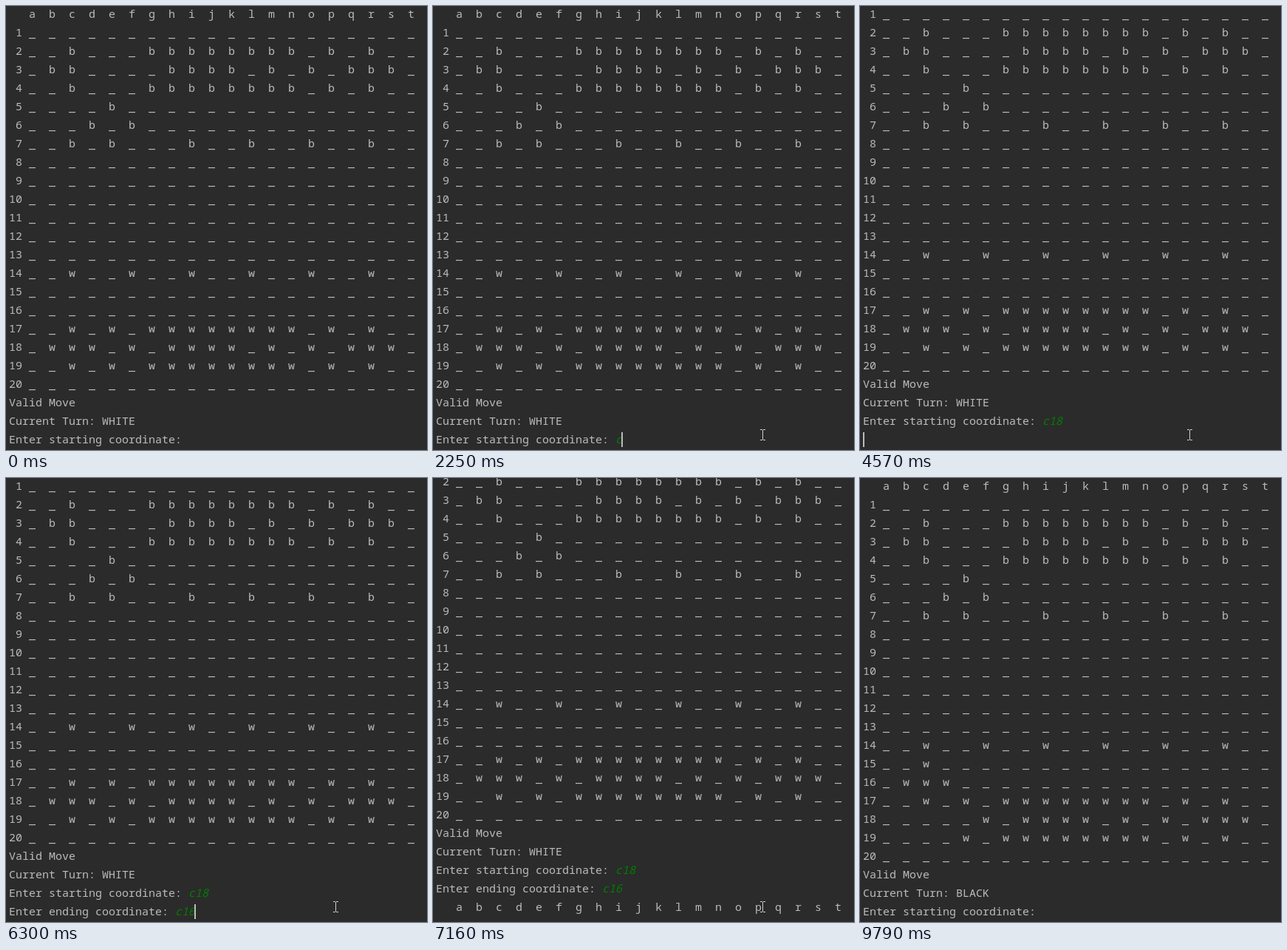
An HTML page that plays this animation: 570 px wide and 600 px high, repeating every 9.89 s.

```html
<!DOCTYPE html>
<html lang="en">
<head>
<meta charset="utf-8">
<title>Console board game</title>
<style>
  html, body { margin: 0; width: 100%; height: 100%; overflow: hidden; background: #2b2b2b; }
  svg { display: block; width: 570px; height: 600px; }
  text { font: 15px "Noto Sans Mono", "DejaVu Sans Mono", monospace; fill: #bbb; white-space: pre; }
  .typed { font-style: italic; fill: #007f00; }
  #caret { fill: #bbb; }
  #pointer { fill: none; stroke: #d0d0d0; }
</style>
</head>
<body>
<svg viewBox="0 0 570 600">
  <g id="page">
    <g id="before"></g>
    <g id="after"></g>
    <rect id="caret" width="2" height="20"/>
  </g>
  <path id="pointer" d="M-3 -6.5H0M1 -6.5H4M.5 -6V7M-3 7.5H0M1 7.5H4"/>
</svg>
<script>
const LOOP = 9890, ROW = 25, CHAR = 9, LEFT = 4, BLINK = 490, TICK = 78;
const $ = id => document.getElementById(id);
const [page, before, after, caret, pointer] =
  ['page', 'before', 'after', 'caret', 'pointer'].map($);

function setAttrs(el, attrs) {
  for (const name in attrs) el.setAttribute(name, attrs[name]);
}

function addText(parent, row, col, str, cls = '', drop = 0) {
  const el = document.createElementNS('http://www.w3.org/2000/svg', 'text');
  setAttrs(el, { x: LEFT + col * CHAR, y: row * ROW + 16 + drop, class: cls });
  el.textContent = str;
  parent.append(el);
  return el;
}

// Columns taken by pieces on each board row
const letters = [...'abcdefghijklmnopqrst'];
const wall = 'cghijklmnpr', pawns = 'ceilor';
const black = { 2: wall, 3: 'bchijkmoqrs', 4: wall, 5: 'e', 6: 'df', 7: pawns };
const white = { 14: 'cfilor', 17: wall + 'e', 18: 'bcdfhijkmoqrs', 19: wall + 'e' };

// The 3x3 block around c18 moves two rows up
const moved = { ...white };
for (let r = 17; r <= 19; r++) moved[r] = white[r].replace(/[b-d]/g, '');
for (let r = 17; r <= 19; r++) moved[r - 2] = (moved[r - 2] ?? '') + white[r].replace(/[^b-d]/g, '');

function addBoard(parent, top, whites, turn) {
  addText(parent, top, 3, letters.join('  '));
  for (let r = 1; r <= 20; r++) {
    const cells = letters.map(c =>
      black[r]?.includes(c) ? 'b' : whites[r]?.includes(c) ? 'w' : '_').join('  ');
    addText(parent, top + r, 0, String(r).padStart(2) + ' ' + cells.replaceAll('_', ' '));
    addText(parent, top + r, 3, cells.replace(/[bw]/g, ' '), '', 1);
  }
  addText(parent, top + 21, 0, 'Valid Move');
  addText(parent, top + 22, 0, 'Current Turn: ' + turn);
  addText(parent, top + 23, 0, 'Enter starting coordinate: ');
}

addBoard(before, 0, white, 'WHITE');
addBoard(after, 25, moved, 'BLACK');
const ask = 'Enter ending coordinate: ';
const start = addText(before, 23, 27, '', 'typed');
const prompt = addText(before, 24, 0, '');
const end = addText(before, 24, ask.length, '', 'typed');

// What reaches the console, and when
const log = [
  [2250, 'c'], [3180, '1'], [3490, '8'], [4570, '\n'], [4740, ask],
  [5280, 'c'], [5990, '1'], [6300, '6'], [7010, '\n']
];
const PRINT = 7160, PRINTED = 7340;

// Pointer strokes: first and last step, then where they lead
const strokes = [[150, 620, 357, 579], [910, 990, 446, 579], [7700, 7950, 504, 526], [8180, 8620, 536, 465]];
const entry = [260, 588];

const mix = (a, b, p) => a + (b - a) * p;
const clamp = p => Math.min(1, Math.max(0, p));
const ease = p => p * p * (3 - 2 * p);
const show = (el, on) => el.style.visibility = on ? 'visible' : 'hidden';

function drawConsole(t) {
  const past = log.filter(([when]) => when <= t);
  const [first, second = '', third] = past.map(([, str]) => str).join('').split('\n');
  start.textContent = first;
  prompt.textContent = second.slice(0, ask.length);
  end.textContent = second.slice(ask.length);
  show(after, t >= PRINT);

  const lines = past.filter(([, str]) => str === '\n').length;
  const step = (PRINTED - PRINT) / 2;
  const printed = clamp(Math.floor((t - PRINT) / step) / 2);
  page.setAttribute('transform',
    `translate(0 ${-(t < PRINT ? lines * ROW : mix(56, 25 * ROW, printed))})`);

  let row = 23 + lines, col = lines ? second.length : 27 + first.length;
  let since = past.length ? past.at(-1)[0] : 430;
  if (!past.length) [row, col] = [22, 19];
  if (lines === 2) col = 0;
  if (t >= PRINTED) [row, col, since] = [48, 27, PRINTED];
  const lit = Math.floor((t - since) / BLINK) % 2 === 0;
  show(caret, lit && (t < PRINT || t >= PRINTED));
  setAttrs(caret, { x: LEFT + Math.max(0, col * CHAR - 1), y: row * ROW + 1 });
}

function drawPointer(t) {
  let [x, y] = entry;
  for (const [from, to, toX, toY] of strokes) {
    const count = Math.floor((to - from) / TICK) + 1;
    const p = ease(clamp((Math.floor((t - from) / TICK) + 1) / count));
    x = mix(x, toX, p);
    y = mix(y, toY, p);
  }
  show(pointer, t >= strokes[0][0] && t < strokes.at(-1)[1]);
  pointer.setAttribute('transform', `translate(${Math.round(x)} ${Math.round(y)})`);
}

const began = performance.now();
function tick() {
  const t = (performance.now() - began) % LOOP;
  drawConsole(t);
  drawPointer(t);
  requestAnimationFrame(tick);
}
tick();
</script>
</body>
</html>
```
